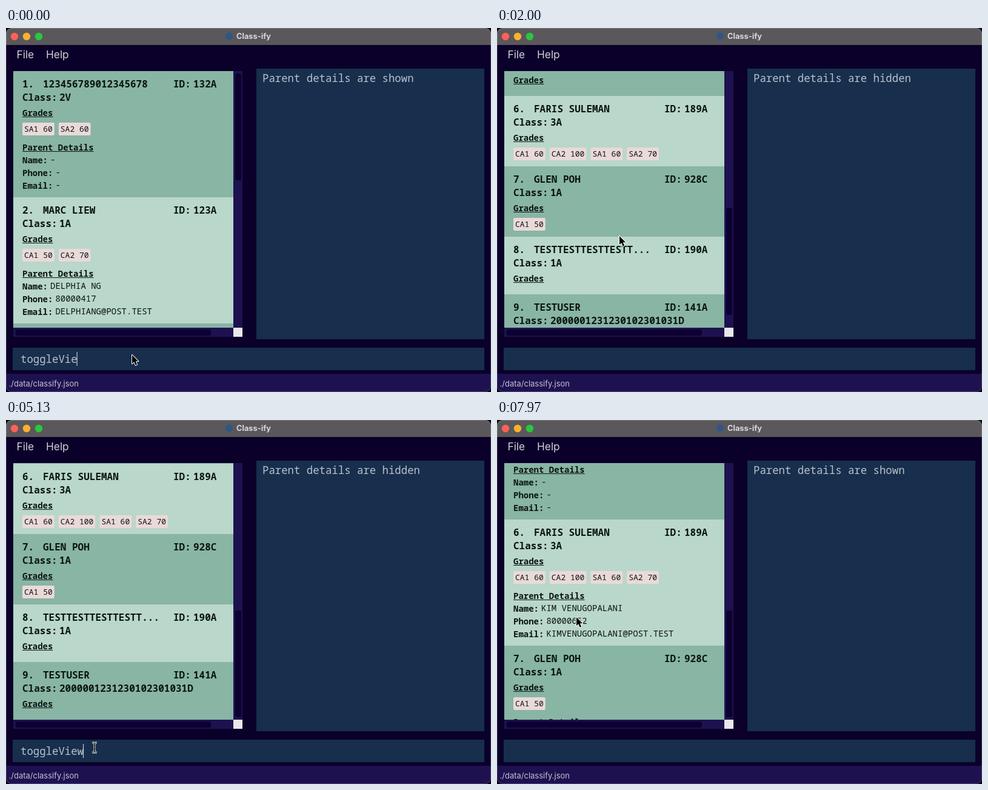
An HTML page with a canvas for the animation above (8 s loop, 800x600 px).

```html
<!DOCTYPE html>
<html lang="en">
<head>
<meta charset="utf-8">
<title>Class-ify</title>
<style>
  html, body { margin: 0; width: 100%; height: 100%; overflow: hidden; background: #000; }
  canvas { display: block; }
</style>
</head>
<body>
<canvas id="stage" width="800" height="600"></canvas>
<script>
const ctx = document.getElementById('stage').getContext('2d');
const MONO = '"Roboto Mono", "Noto Sans Mono", "Liberation Mono", monospace';
const SANS = 'Inter, Roboto, sans-serif';
const LOOP = 8000;
const COLOR = {
  back: '#0a0029', bar: '#1e1150', panel: '#172e4d', thumb: '#0b0030',
  dark: '#88b5a4', light: '#b9d7ca', tag: '#ead9d9', ink: '#0b1512', pale: '#b8c2cb'
};
const LIST = { x: 12, y: 71, w: 363, h: 423 };

// Times of the two commands and of the scroll gesture, in ms.
const HIDE = 350, SHOW = 5300;
const SCROLL_START = 1165, SCROLL_TIME = 1000;
const TYPE_START = 3700, TYPE_STEP = 140;
const SHOWN_OFFSET = 926;
const COMMAND = 'toggleView';

const students = [
  { name: '123456789012345678', id: '132A', group: '2V', grades: ['SA1 60', 'SA2 60'] },
  { name: 'MARC LIEW', id: '123A', group: '1A', grades: ['CA1 50', 'CA2 70'],
    parent: ['DELPHIA NG', '80000417', 'DELPHIANG@POST.TEST'] },
  { name: 'GENEVIEVE MONTALDO', id: '435A', group: '2A', grades: ['CA1 80'] },
  { name: 'SIMON KHOR', id: '456B', group: '1A', grades: ['SA1 20', 'SA2 50'] },
  { name: 'HELLO', id: '149A', group: 'A'.repeat(29) + '...', grades: [], indent: 3 },
  { name: 'FARIS SULEMAN', id: '189A', group: '3A', grades: ['CA1 60', 'CA2 100', 'SA1 60', 'SA2 70'],
    parent: ['KIM VENUGOPALANI', '80000652', 'KIMVENUGOPALANI@POST.TEST'] },
  { name: 'GLEN POH', id: '928C', group: '1A', grades: ['CA1 50'] },
  { name: 'TESTTESTTESTTESTT...', id: '190A', group: '1A', grades: [] },
  { name: 'TESTUSER', id: '141A', group: '2000001231230102301031D', grades: [] }
];

// Pointer stops: time, x, y.
const pointerPath = [
  [0, 208, 539], [500, 208, 539], [930, 204, 476], [1300, 202, 343], [2200, 202, 343],
  [2650, 146, 540], [5400, 146, 540], [6100, 108, 343], [7000, 108, 343], [7700, 131, 325]
];

const clamp = v => Math.min(1, Math.max(0, v));
const ease = v => v * v * (3 - 2 * v);

function box(x, y, w, h, color, radius = 0) {
  ctx.fillStyle = color;
  ctx.beginPath();
  ctx.roundRect(x, y, w, h, radius);
  ctx.fill();
}

function dot(x, y, r, color) {
  ctx.fillStyle = color;
  ctx.beginPath();
  ctx.arc(x, y, r, 0, 2 * Math.PI);
  ctx.fill();
}

// Text placed by its left edge and the middle of its capitals.
function text(str, x, middle, size, { weight = 400, color = COLOR.ink, family = MONO } = {}) {
  ctx.font = `${weight} ${size}px ${family}`;
  ctx.fillStyle = color;
  ctx.fillText(str, x, Math.round(middle + size * 0.36));
  return ctx.measureText(str).width;
}

function heading(str, x, middle) {
  const width = text(str, x, middle, 14, { weight: 600 });
  box(x, middle + 6, width, 1, COLOR.ink);
}

function cardHeight(student, withParent) {
  return 95 + (student.grades.length ? 21 : 0) + (withParent ? 92 : 0);
}

function drawCard(student, index, top, withParent) {
  const strong = { weight: 600 };
  const indent = student.indent || 0;
  box(LIST.x, top, LIST.w, cardHeight(student, withParent), index % 2 ? COLOR.light : COLOR.dark);
  text(`${index + 1}.`, 27, top + 21, 16, strong);
  text(student.name, 61, top + 21, 16, strong);
  text('ID:', 276, top + 21, 16, strong);
  text(student.id, 309, top + 21, 16, strong);
  text('Class:', 27 + indent, top + 43, 16, strong);
  text(student.group, 88 + indent, top + 43, 16, strong);
  heading('Grades', 27, top + 69);

  let x = 27;
  for (const grade of student.grades) {
    const width = grade.length * 7.8 + 6;
    box(x, top + 85, width, 21, COLOR.tag, 2);
    text(grade, x + 3, top + 95.5, 13);
    x += width + 7;
  }

  if (!withParent) return;
  const y = top + (student.grades.length ? 126 : 105);
  heading('Parent Details', 27, y);
  ['Name:', 'Phone:', 'Email:'].forEach((label, i) => {
    const row = y + 21 * (i + 1);
    const width = text(label, 27, row, 14, strong);
    text(student.parent ? student.parent[i] : '-', 31 + width, row - 1, 14);
  });
}

function drawList(t, withParent) {
  const heights = students.map(s => cardHeight(s, withParent));
  const range = heights.reduce((a, b) => a + b) - LIST.h;
  const progress = ease(clamp((t - SCROLL_START) / SCROLL_TIME));
  const offset = t >= SHOW ? SHOWN_OFFSET : progress * range;

  ctx.save();
  ctx.beginPath();
  ctx.rect(LIST.x, LIST.y, LIST.w, LIST.h);
  ctx.clip();
  let top = LIST.y - Math.round(offset);
  students.forEach((student, i) => {
    if (top < LIST.y + LIST.h && top + heights[i] > LIST.y) drawCard(student, i, top, withParent);
    top += heights[i];
  });
  ctx.restore();

  const thumb = !withParent && progress === 0 ? 136 : 176;
  box(375, 71, 15, 423, COLOR.bar);
  box(378, 75 + progress * (415 - thumb), 10, thumb, COLOR.thumb, 3);
  box(12, 494, 363, 15, COLOR.bar);
  box(16, 497, 322, 10, COLOR.thumb, 3);
  box(375, 494, 15, 15, '#e9e8ea');
}

function typedText(t) {
  if (t < HIDE) return COMMAND.slice(0, t < 110 ? 9 : 10);
  if (t < TYPE_START || t >= SHOW) return '';
  return COMMAND.slice(0, 1 + Math.floor((t - TYPE_START) / TYPE_STEP));
}

function drawInput(t) {
  const typed = typedText(t);
  const width = text(typed, 24, 546, 17.33, { weight: 300, color: COLOR.pale });
  const blinkStart = t >= SHOW ? SHOW : HIDE;
  if (typed || (t - blinkStart) % 1000 < 500) {
    box(typed ? 23 + width : 22.5, 534, 1.2, 23, '#c3c9d0');
  }
}

function drawWindow() {
  ctx.clearRect(0, 0, 800, 600);
  box(0, 0, 800, 600, COLOR.back, 9);
  box(0, 0, 800, 28, '#5a585b', [9, 9, 0, 0]);
  box(0, 570, 800, 30, COLOR.bar, [0, 0, 9, 9]);
  ['#ff5f57', '#ffb02e', '#28c840'].forEach((color, i) => dot(14 + 20 * i, 14, 6.2, color));
  dot(368, 13.5, 6, '#2f5688');
  text('Class-ify', 380, 13.5, 12.8, { weight: 700, color: '#d9d8da', family: SANS });
  text('File', 17.5, 44, 17.3, { color: '#d2d0da', family: SANS });
  text('Help', 66, 44, 17.3, { color: '#d2d0da', family: SANS });
  text('./data/classify.json', 4.5, 586, 13, { color: '#c4c1d0', family: SANS });
  box(413, 67, 376, 446, COLOR.panel);
  box(11, 527, 778, 37, COLOR.panel);
  ctx.strokeStyle = 'rgba(255,255,255,.2)';
  ctx.lineWidth = 1;
  ctx.beginPath();
  ctx.roundRect(0.5, 0.5, 799, 599, 9);
  ctx.stroke();
}

function pointerAt(t) {
  const next = pointerPath.findIndex(stop => stop[0] > t);
  if (next < 0) return pointerPath.at(-1).slice(1);
  const [t0, x0, y0] = pointerPath[next - 1];
  const [t1, x1, y1] = pointerPath[next];
  const k = ease((t - t0) / (t1 - t0));
  return [x0 + (x1 - x0) * k, y0 + (y1 - y0) * k];
}

const arrow = new Path2D('M0 0V14.2L3.3 11.2L5.7 16.8L8.2 15.7L5.8 10.3H10.2Z');
const beam = new Path2D('M-4 -8H-2Q0 -8 0 -6V6Q0 8 -2 8H-4M4 -8H2Q0 -8 0 -6V6Q0 8 2 8H4M-2 2H2');

function drawPointer(t) {
  const [x, y] = pointerAt(t);
  ctx.save();
  ctx.translate(x, y);
  ctx.lineJoin = 'round';
  if (y > 527 && t > 1000) {
    ctx.strokeStyle = '#fff';
    ctx.lineWidth = 3;
    ctx.stroke(beam);
    ctx.strokeStyle = '#000';
    ctx.lineWidth = 1;
    ctx.stroke(beam);
  } else {
    ctx.strokeStyle = '#fff';
    ctx.lineWidth = 2;
    ctx.stroke(arrow);
    ctx.fillStyle = '#000';
    ctx.fill(arrow);
  }
  ctx.restore();
}

function draw(now) {
  const t = now % LOOP;
  const withParent = t < HIDE || t >= SHOW;
  drawWindow();
  drawList(t, withParent);
  text(`Parent details are ${withParent ? 'shown' : 'hidden'}`, 423, 83, 17.33, { weight: 300, color: COLOR.pale });
  drawInput(t);
  drawPointer(t);
  requestAnimationFrame(() => draw(performance.now()));
}
draw(0);
</script>
</body>
</html>
```
